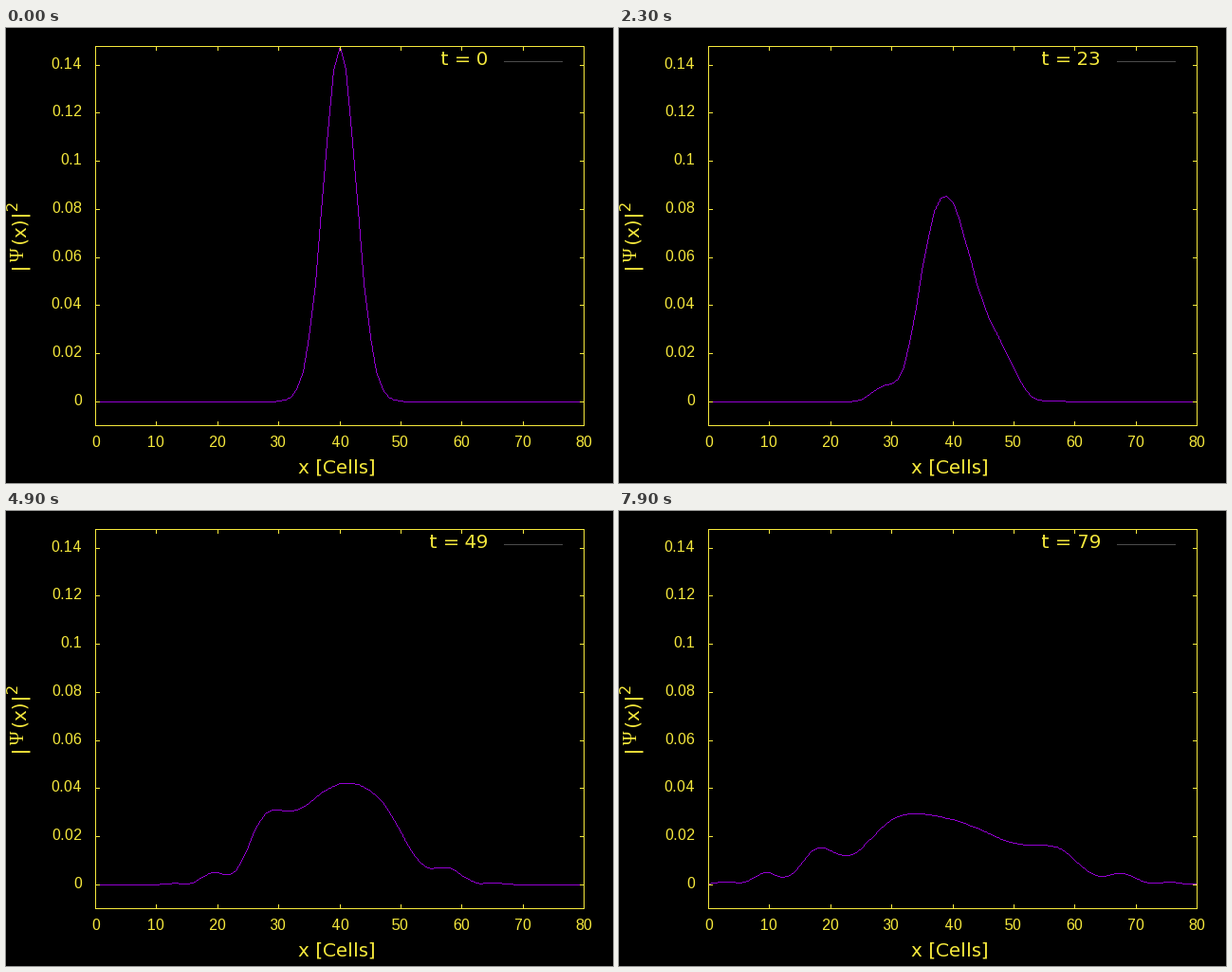
Animation, 640 px wide and 480 px high, one loop 8 s. Source, as a matplotlib script:

```python
import numpy as np
import matplotlib.pyplot as plt
from matplotlib.animation import FuncAnimation
from matplotlib.colors import to_rgba

W, H, DPI = 640, 480, 100
STEPS, CELLS, PAD = 80, 80, 90
SIGMA = 2.7
YELLOW, PURPLE, KEY = "#f5e83c", "#9400d3", "#4c4c4c"
LEFT, RIGHT, TOP, BOTTOM = 94, 609, 19, 419
Y_MIN, Y_MAX = -0.01, 0.1478
TICK = 4

# Whole-pixel glyph advances
plt.rcParams["text.hinting_factor"] = 1


def col(x):
    return np.rint(LEFT + (RIGHT - LEFT) * np.asarray(x) / CELLS).astype(int)


def row(y):
    up = (BOTTOM - TOP) * (np.asarray(y) - Y_MIN) / (Y_MAX - Y_MIN)
    return BOTTOM - np.rint(up).astype(int)


def quantum_walk():
    """Density of a balanced-coin walk, started as a left-moving Gaussian."""
    x = np.arange(-PAD, CELLS + PAD + 1)
    left = np.exp(-((x - CELLS / 2) ** 2) / (4 * SIGMA ** 2))
    left /= np.sqrt(np.sum(left ** 2))
    right = np.zeros_like(left)
    rows = []
    for _ in range(STEPS):
        rows.append((left ** 2 + right ** 2)[PAD:PAD + CELLS + 1])
        left, right = (left - right) / np.sqrt(2), (left + right) / np.sqrt(2)
        left, right = np.roll(left, -1), np.roll(right, 1)
    return rows


def stroke(layer, xs, ys, color):
    """Draw a hard-edged polyline, one pixel wide."""
    for x0, y0, x1, y1 in zip(xs[:-1], ys[:-1], xs[1:], ys[1:]):
        n = max(abs(x1 - x0), abs(y1 - y0)) + 1
        c = np.rint(np.linspace(x0, x1, n)).astype(int)
        r = np.rint(np.linspace(y0, y1, n)).astype(int)
        layer[r, c] = to_rgba(color)


def blank():
    return np.zeros((H, W, 4))


fig = plt.figure(figsize=(W / DPI, H / DPI), dpi=DPI, facecolor="black")
ax = fig.add_axes([0, 0, 1, 1])
ax.axis("off")


def show(layer, z):
    return ax.imshow(layer, extent=(0, W, H, 0), aspect="auto",
                     interpolation="nearest", zorder=z)


def text(x, y, s, size, font="DejaVu Sans", **kw):
    return ax.text(x, y, s, fontsize=size * 72 / DPI, family=font,
                   color=YELLOW, va="baseline", zorder=3, **kw)


def upright(x, y, s, size=20, font="DejaVu Sans"):
    text(x, y, s, size, font, rotation=90, rotation_mode="anchor", ha="left")


# Frame, mirrored ticks and key line
grid = blank()
for v in range(0, CELLS + 1, 10):
    c = int(col(v))
    stroke(grid, [c, c], [BOTTOM, BOTTOM - TICK], YELLOW)
    stroke(grid, [c, c], [TOP, TOP + TICK], YELLOW)
    text(c - 9 * len(str(v)) // 2, 442, str(v), 16, "Liberation Sans", ha="left")
for v in 0.02 * np.arange(8):
    r = int(row(v))
    stroke(grid, [LEFT, LEFT + TICK], [r, r], YELLOW)
    stroke(grid, [RIGHT, RIGHT - TICK], [r, r], YELLOW)
    text(80.2, r + 4, f"{v:g}", 16, "Liberation Sans", ha="right")
stroke(grid, [LEFT, RIGHT, RIGHT, LEFT, LEFT],
       [TOP, TOP, BOTTOM, BOTTOM, TOP], YELLOW)
stroke(grid, [525, 586], [35, 35], KEY)
show(grid, 2)

# Axis labels and counter
text(308, 470, "x [Cells]", 20, ha="left")
upright(19, 254, "|")
upright(19, 247, "Ψ", 20, "Liberation Serif")
upright(19, 227, "(x)|")
upright(12, 192, "2", 16)
label = text(508.2, 39, "", 20, ha="right")

density = quantum_walk()
columns = col(np.arange(CELLS + 1))
curve = show(blank(), 1)
ax.set_xlim(0, W)
ax.set_ylim(H, 0)


def draw(t):
    layer = blank()
    stroke(layer, columns, row(density[t]), PURPLE)
    curve.set_data(layer)
    label.set_text(f"t = {t}")
    return curve, label


anim = FuncAnimation(fig, draw, frames=STEPS, interval=100,
                     repeat=True, repeat_delay=0, blit=False)
plt.show()
```
